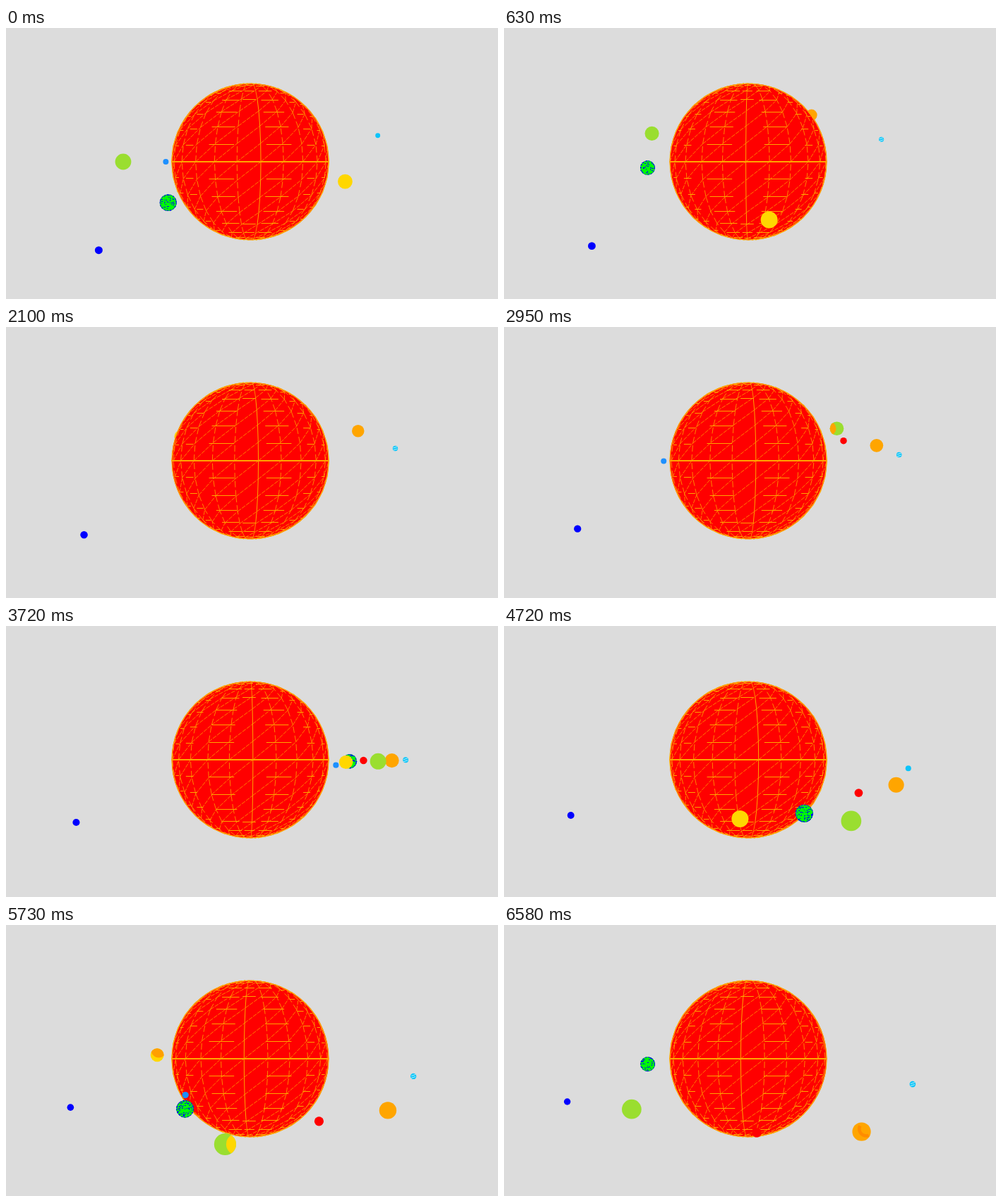
These frames come from a looping animation (697 px wide and 385 px high, 6.65 s). An HTML page with a canvas:

```html
<!DOCTYPE html>
<html lang="en">
<head>
<meta charset="utf-8">
<title>Planets</title>
<style>
html, body { margin: 0; width: 100%; height: 100%; overflow: hidden; background: #dcdcdc; }
canvas { display: block; }
</style>
</head>
<body>
<canvas id="stage" width="697" height="385"></canvas>
<script>
const ctx = document.getElementById('stage').getContext('2d');
const LOOP = 6650, STEP = 77.33;
const CX = 346, CY = 190;
const DIST = 577, SUN = 109.5, RIM = 111.3;
const TILT = 0.5, DEPTH = 0.0015;
const ORANGE = '#ffa500', GOLD = '#ffd700';
const rad = a => a * Math.PI / 180;

// patch: [every, at] picks the steps where a second colour shows through
const planets = [
  { orbit: 119.6, size: 4, start: 180, speed: 18.8, color: '#1e90ff' },
  { orbit: 134.4, size: 9.6, start: 22.7, speed: 7.05, color: GOLD, patch: [12, 2], paint: venusPatch },
  { orbit: 140, size: 10.2, start: 135, speed: 4.7, color: '#00ff00', paint: speckle },
  { orbit: 160, size: 5.2, start: -112.7, speed: 2.35, color: '#ff0000' },
  { orbit: 180, size: 11.4, start: 180, speed: 3.76, color: '#9ade30', patch: [12, 2], paint: sidePatch },
  { orbit: 200, size: 10, start: -67.4, speed: 1.41, color: ORANGE, patch: [14, 1], paint: darkPatch },
  { orbit: 220, size: 3.9, start: -22.4, speed: 0.467, color: '#0cc4fa', paint: streaks },
  { orbit: 240, size: 4, start: 130.5, speed: 0.2835, color: '#0000ff' }
];

function random(seed) {
  let s = seed * 7919 + 17;
  return () => (s = (s * 16807) % 2147483647) / 2147483647;
}

function disc(x, y, r, color) {
  ctx.fillStyle = color;
  ctx.beginPath();
  ctx.arc(x, y, r, 0, 2 * Math.PI);
  ctx.fill();
}

function line(x1, y1, x2, y2) {
  ctx.beginPath();
  ctx.moveTo(x1, y1);
  ctx.lineTo(x2, y2);
  ctx.stroke();
}

function venusPatch(p) {
  disc(p.x + 0.25 * p.r, p.y - 0.75 * p.r, 1.15 * p.r, '#ffa000');
}

function sidePatch(p) {
  const side = p.x < CX ? 1 : -1;
  disc(p.x + side * 1.1 * p.r, p.y, p.r, p.z < 0 ? ORANGE : GOLD);
}

function darkPatch(p) {
  ctx.strokeStyle = '#ff8c00';
  ctx.lineWidth = p.r * 0.35;
  ctx.beginPath();
  ctx.arc(p.x + 0.5 * p.r, p.y - 0.3 * p.r, 0.75 * p.r, 1.2, 3.6);
  ctx.stroke();
}

function speckle(p, n) {
  const rnd = random(n + 1);
  ctx.fillStyle = '#0000ff';
  for (let y = -p.r; y < p.r; y++)
    for (let x = -p.r; x < p.r; x += 2)
      if (rnd() < 0.25) ctx.fillRect(Math.round(p.x + x), Math.round(p.y + y), 1 + rnd() * 2 | 0, 1);
  ctx.strokeStyle = '#0000ff';
  ctx.lineWidth = 2;
  ctx.setLineDash([3, 1.5]);
  ctx.beginPath();
  ctx.arc(p.x, p.y, p.r, 0, 2 * Math.PI);
  ctx.stroke();
  ctx.setLineDash([]);
}

function streaks(p, n) {
  if (![1, 3, 4, 6].includes(n % 7)) return;
  ctx.strokeStyle = '#b8f0f4';
  ctx.lineWidth = 1;
  for (const d of [-1.5, 1.5]) line(p.x - 3, p.y + d + 1, p.x + 3, p.y + d - 1);
}

function place(planet, m) {
  const a = rad(planet.start + planet.speed * m);
  const z = planet.orbit * Math.sin(a);
  const k = 1 / (1 - DEPTH * z);
  return {
    x: CX + planet.orbit * Math.cos(a) * k,
    y: CY + z * TILT * k,
    r: planet.size * k, z, planet
  };
}

function drawPlanet(p, n) {
  const { color, patch, paint } = p.planet;
  disc(p.x, p.y, p.r, color);
  if (!paint || (patch && n % patch[0] !== patch[1])) return;
  ctx.save();
  ctx.beginPath();
  ctx.arc(p.x, p.y, p.r, 0, 2 * Math.PI);
  ctx.clip();
  paint(p, n);
  ctx.restore();
}

function onSun(lat, lon) {
  const c = SUN * Math.cos(rad(lat));
  const z = c * Math.cos(rad(lon));
  const k = 1 / (1 - z / DIST);
  return { x: CX + c * Math.sin(rad(lon)) * k, y: CY - SUN * Math.sin(rad(lat)) * k, z };
}

function meshLine(a, b, width, dash) {
  if (a.z < 16 || b.z < 16) return;
  ctx.lineWidth = width;
  ctx.setLineDash(dash);
  line(a.x, a.y, b.x, b.y);
}

function drawSun(m) {
  const dLat = 11.25, dLon = 14.4;
  const phase = (6.4 + 2.587 * m) % dLon;
  disc(CX, CY, RIM, '#ff0000');
  ctx.strokeStyle = ORANGE;
  for (let i = -7; i <= 6; i++) {
    const lon = phase + i * dLon;
    const middle = Math.abs(lon) < dLon / 2;
    for (let j = -8; j < 8; j++) {
      const low = j * dLat, high = low + dLat;
      const corner = onSun(low, lon);
      meshLine(corner, onSun(high, lon), middle && Math.abs(j + 0.5) < 4 ? 1 : 0.8, middle ? [] : [9, 4]);
      meshLine(corner, onSun(high, lon + dLon), 0.75, [6, 1.5]);
    }
  }
  // parallels show as short level dashes
  ctx.setLineDash([]);
  ctx.lineWidth = 1;
  for (let j = 1; j < 7; j++) {
    const bands = [[10, 27], [-27, -10], [40, 48], [-48, -40], [58, 65], [-65, -58]];
    if (j > 3) bands.push([-7, 5]);
    for (const [from, to] of bands) {
      const a = onSun(j * dLat, from), b = onSun(j * dLat, to);
      const dy = Math.floor(CY - onSun(j * dLat, (from + to) / 2).y) - 0.5;
      if (Math.min(a.z, b.z) < 16) continue;
      line(a.x, CY - dy, b.x, CY - dy);
      line(a.x, CY + dy, b.x, CY + dy);
    }
  }
  ctx.lineWidth = 2;
  line(CX - RIM, CY, CX + RIM, CY);
  ctx.lineWidth = 1.3;
  ctx.beginPath();
  ctx.arc(CX, CY, RIM - 0.4, 0, 2 * Math.PI);
  ctx.stroke();
}

const start = performance.now();

function draw() {
  const t = (performance.now() - start) % LOOP;
  const n = Math.min(85, Math.floor((t + 7.5) / STEP));
  const m = n * (1.0144 - 0.00019 * n);
  ctx.fillStyle = '#dcdcdc';
  ctx.fillRect(0, 0, 697, 385);
  const placed = planets.map(p => place(p, m)).sort((a, b) => a.z - b.z);
  placed.filter(p => p.z < 0).forEach(p => drawPlanet(p, n));
  drawSun(m);
  placed.filter(p => p.z >= 0).forEach(p => drawPlanet(p, n));
  requestAnimationFrame(draw);
}
draw();
</script>
</body>
</html>
```
